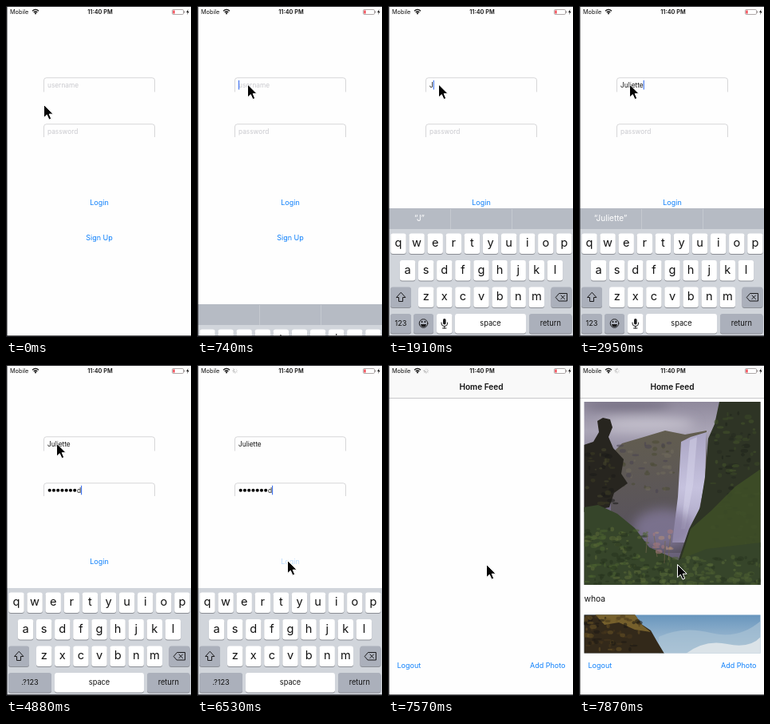
Recreate the animation shown at these times as an HTML page. Size 232 px wide and 414 px high, loop 8000 ms.

```html
<!DOCTYPE html>
<html lang="en">
<head>
<meta charset="utf-8">
<title>Login flow</title>
<style>
  html, body { margin: 0; width: 100%; height: 100%; overflow: hidden; background: #fff; }
  svg { display: block; width: 100vw; height: 100vh; }
  text { font-family: Inter, Roboto, "Liberation Sans", sans-serif; font-size: 8.3px; fill: #111; white-space: pre; }
  .hint { fill: #c9c9ce; }
  .link { font-size: 9px; fill: #0f80fb; }
  .mid { text-anchor: middle; }
  .end { text-anchor: end; }
  .key { font-size: 14.6px; text-anchor: middle; }
  .small { font-size: 9.2px; text-anchor: middle; }
  .line { fill: none; stroke: #1b1b1d; stroke-linecap: round; stroke-linejoin: round; }
  .caret { fill: #3a6ff0; }
</style>
</head>
<body>
<svg id="stage" viewBox="0 0 232 414" preserveAspectRatio="none">
  <defs>
    <linearGradient id="sky" x2="0" y2="1">
      <stop offset="0" stop-color="#8f899c"/><stop offset=".16" stop-color="#aaa5b6"/>
      <stop offset=".4" stop-color="#77708a"/><stop offset="1" stop-color="#625a70"/>
    </linearGradient>
    <linearGradient id="fall" x2="0" y2="1">
      <stop offset="0" stop-color="#aaa5c3"/><stop offset=".5" stop-color="#c6c2de"/><stop offset="1" stop-color="#a59fbe"/>
    </linearGradient>
    <linearGradient id="hill" x2="0" y2="1">
      <stop offset="0" stop-color="#625d4f"/><stop offset="1" stop-color="#565060"/>
    </linearGradient>
    <linearGradient id="blue" x2="0" y2="1">
      <stop offset="0" stop-color="#6795bd"/><stop offset="1" stop-color="#b4c9d9"/>
    </linearGradient>
    <filter id="soft" x="-50%" y="-50%" width="200%" height="200%"><feGaussianBlur stdDeviation="7"/></filter>
    <clipPath id="pic1"><rect x="6.5" y="46" width="221" height="229"/></clipPath>
    <clipPath id="pic2"><rect x="6.5" y="312.5" width="221" height="48"/></clipPath>
  </defs>

  <rect width="232" height="414" fill="#fefefe"/>
  <g id="login">
    <g fill="none" stroke="#d2d2d4" stroke-width=".9">
      <path d="M47.5 107.5V93q0-3.2 3.2-3.2H183.300q3.200 0 3.200 3.200V107.500"/>
      <path d="M47.500 164V151q0-3.200 3.200-3.200H183.300q3.200 0 3.200 3.200V164"/>
    </g>
    <text id="userHint" class="hint" x="52" y="102">username</text>
    <text id="user" x="52" y="102"></text>
    <text id="passHint" class="hint" x="52" y="160">password</text>
    <g id="dots" fill="#050505"></g>
    <text id="last" y="160"></text>
    <rect id="caret" class="caret" width="1.1" height="11.5"/>
    <text id="loginBtn" class="link mid" x="117" y="248.700">Login</text>
    <text class="link mid" x="117" y="293">Sign Up</text>
  </g>

  <g id="home">
    <rect y="0" width="232" height="414" fill="#fefefe"/>
    <rect width="232" height="41" fill="#f9f9f9"/>
    <rect y="41" width="232" height=".7" fill="#b4b4b6"/>
    <text class="mid" x="117" y="31" font-weight="600" style="font-size:10.1px">Home Feed</text>
    <g id="feed">
      <g clip-path="url(#pic1)" id="photo1"></g>
      <text x="6.500" y="295.500" style="font-size:10.300px">whoa</text>
      <g clip-path="url(#pic2)" id="photo2"></g>
    </g>
    <text class="link" x="11.500" y="378.500">Logout</text>
    <text class="link end" x="222.500" y="378.500">Add Photo</text>
  </g>

  <g id="keyboard"></g>

  <g id="status">
    <text x="5" y="10" style="font-size:7.300px">Mobile</text>
    <g fill="none" stroke="#111" stroke-width="1.300">
      <path d="M33 6.200q4-3.600 8 0M34.700 8q2.300-2 4.600 0"/>
      <circle cx="37" cy="9.300" r=".5"/>
    </g>
    <g id="spinner" stroke="#777" stroke-width=".8" stroke-linecap="round"></g>
    <text class="mid" x="118" y="10" font-weight="600" style="font-size:7.300px">11:40 PM</text>
    <rect x="208.500" y="4.500" width="14" height="6" rx="1.200" fill="#fff" stroke="#8d8585" stroke-width=".7"/>
    <rect x="209.500" y="5.500" width="2" height="4" fill="#f0303c"/>
    <rect x="223.300" y="6.300" width="1" height="2.400" fill="#8d8585"/>
    <path d="M228.500 4l-2.400 4h1.700l-.7 3 2.500-4.200h-1.700z" fill="#111"/>
  </g>

  <path id="pointer" d="M0 0V16.200L3.800 12.700L6.500 18.700L9.200 17.500L6.700 11.700H11.700Z" fill="#050505" stroke="#fff" stroke-width="1"/>
  <path d="M0 0H232V.9H1.500V412.300H232V414H0Z" fill="#1c1c1f"/>
</svg>

<script>
const LOOP = 8000;
const NAME = 'Juliette';
const PASS = 'password';
const $ = id => document.getElementById(id);

// Each row: start time, then the value held until the next row.
const pointerPath = [
  [0, 47.5, 123.5], [150, 50, 119], [290, 58, 106], [440, 63.5, 98],
  [5330, 70, 112], [5480, 90, 150], [5630, 112, 195], [5780, 126, 227],
  [5930, 120, 240], [6080, 113.5, 244.5], [6830, 117, 246], [6970, 123.5, 249.5]
];
const keyboardDrop = [
  [0, 170], [740, 120], [880, 22], [1030, 1.5], [1180, 0],
  [7120, 42], [7270, 112], [7420, 170]
];
const homeDrop = [[0, 414], [7270, 190], [7420, 35], [7570, 0]];
const nameLength = [
  [0, 0], [1770, 1], [1920, 2], [2060, 3], [2210, 4],
  [2360, 5], [2500, 6], [2800, 7], [2950, 8]
];
const passLength = [
  [0, 0], [3690, 1], [3840, 2], [3990, 3], [4280, 4],
  [4580, 5], [4730, 7], [4880, 8]
];
const loginFade = [[0, 1], [6380, .2], [6530, .27], [6680, 1]];
const FOCUS_USER = 740, FOCUS_PASS = 3090, MASK_ALL = 6970;
const SPIN = 6530, FEED = 7720;

const rowAt = (table, t) => table.filter(r => r[0] <= t).pop();
const at = (table, t) => rowAt(table, t)[1];
const show = (el, on) => el.setAttribute('display', on ? 'inline' : 'none');
const move = (el, x, y) => el.setAttribute('transform', `translate(${x} ${y})`);

function cap(x, y, w, fill = '#fff', h = 25.5) {
  return `<rect x="${x}" y="${y + 1}" width="${w}" height="${h}" rx="3" fill="#8b8e95"/>` +
    `<rect x="${x}" y="${y}" width="${w}" height="${h}" rx="3" fill="${fill}"/>`;
}
function keyRow(letters, cx, y) {
  return [...letters].map((c, i) => {
    const x = cx + i * 23.1;
    return cap(x - 9.7, y, 19.4) + `<text class="key" x="${x}" y="${y + 16.6}">${c}</text>`;
  }).join('');
}
function wordKey(word, x, w, fill) {
  return cap(x, 385, w, fill, 24.5) + `<text class="small" x="${x + w / 2}" y="400.3">${word}</text>`;
}

function buildKeyboard() {
  const grey = '#abb0bb';
  $('keyboard').innerHTML = `
    <g id="bar">
      <rect y="253" width="232" height="27" fill="#b6bbc4"/>
      <path d="M78.500 254V279M155.500 254V279" stroke="#c9cdd4" stroke-width=".8"/>
      <text id="suggest" class="mid" x="39.500" y="268.500" style="font-size:10px;fill:#fff"></text>
    </g>
    <rect y="279" width="232" height="135" fill="#d1d5db"/>
    ${keyRow('qwertyuiop', 13, 284.5)}
    ${keyRow('asdfghjkl', 24.6, 318)}
    ${keyRow('zxcvbnm', 47.7, 351.5)}
    ${cap(3, 351.5, 26, grey)}${cap(204.5, 351.5, 26, grey)}
    <path class="line" d="M16 358.500L10.500 364.500H13.500V369.500H18.500V364.500H21.500Z"/>
    <path class="line" d="M210.500 364.200L214.500 359.500H224.500V369H214.500ZM217 362L221.500 366.500M221.500 362L217 366.500"/>
    <g id="textKeys">
      ${wordKey('123', 3, 26, grey)}${cap(32, 385, 25, grey, 24.5)}${cap(61, 385, 19.5, '#fff', 24.5)}
      ${wordKey('space', 84, 89, '#fff')}
      <circle class="line" cx="44.500" cy="397" r="5.300"/>
      <path d="M41 398H48Q47.500 401.500 44.500 401.500T41 398Z" fill="#1b1b1d"/>
      <circle cx="42.600" cy="395" r=".9"/><circle cx="46.400" cy="395" r=".9"/>
      <rect x="69" y="391" width="3.600" height="7.500" rx="1.800" fill="#1b1b1d"/>
      <path class="line" d="M67 396V397Q67 400.500 70.800 400.500T74.600 397V396M70.800 400.500V403M68.500 403H73"/>
    </g>
    <g id="secureKeys">${wordKey('.?123', 3, 54, grey)}${wordKey('space', 61, 112, '#fff')}</g>
    ${wordKey('return', 177, 53.5, grey)}`;
}

// Seeded tufts give rock and grass their speckled texture.
function tufts(n, seed, x, y, w, h, colors) {
  let s = seed, out = '';
  const rnd = () => (s = (s * 16807) % 2147483647) / 2147483647;
  for (let i = 0; i < n; i++) {
    const c = colors[Math.floor(rnd() * colors.length)];
    out += `<ellipse cx="${x + rnd() * w}" cy="${y + rnd() * h}" rx="${1 + rnd() * 4}" ry="${1 + rnd() * 2}" fill="${c}" opacity=".55"/>`;
  }
  return out;
}
const shape = (d, fill, extra = '') => `<path d="${d}" fill="${fill}" ${extra}/>`;

function buildPhotos() {
  const cliff = 'M176 46H228V276H132L124 246L138 205L152 178L158 140L162 92L170 74Z';
  const grass = 'M6 178L24 175L48 186L70 204L88 228L124 244L160 230L228 222V276H6Z';
  $('photo1').innerHTML =
    '<rect x="6" y="46" width="222" height="230" fill="url(#sky)"/>' +
    '<g filter="url(#soft)"><ellipse cx="85" cy="74" rx="60" ry="8" fill="#c5c1cd"/><ellipse cx="60" cy="50" rx="55" ry="7" fill="#777184"/></g>' +
    shape('M40 112L54 98L78 91L108 82L133 87L160 82V235H40Z', 'url(#hill)') +
    tufts(45, 31, 50, 96, 72, 65, ['#4c4b36', '#6f6a5c', '#4a4450']) +
    shape('M128 96L140 90L160 84L158 145L149 190L140 222L117 222L124 165Z', 'url(#fall)') +
    shape('M139 94L148 90L143 150L133 205L128 205L134 150Z', '#d8d5ec', 'opacity=".5"') +
    '<ellipse cx="106" cy="205" rx="38" ry="25" fill="#857c9d" opacity=".75" filter="url(#soft)"/>' +
    shape('M6 100L18 96L25 84L23 70L30 66L39 68L42 78L37 90L43 104L56 118L53 136L61 148L44 160L38 178L6 184Z', '#27251f') +
    tufts(35, 77, 10, 104, 36, 70, ['#3b3b24', '#1b1a18', '#45452c']) +
    shape(cliff, '#2e3425') +
    tufts(110, 5, 168, 60, 60, 165, ['#44552b', '#1e231b', '#3b4a27', '#262a20']) +
    shape('M228 130L196 152L166 182L140 205L128 242L150 236L228 228Z', '#3f4f27', 'opacity=".85"') +
    shape(grass, '#36452a') +
    tufts(150, 12, 8, 205, 78, 70, ['#4c6130', '#27331e', '#5b6b38']) +
    tufts(130, 99, 90, 240, 138, 35, ['#4d5f32', '#29351f', '#586a3a']) +
    '<path d="M107 248L108 220M98 240L94 213M112 244L115 212M84 235L86 212" stroke="#75684c" stroke-width=".7"/>' +
    tufts(12, 41, 90, 208, 26, 26, ['#a97a7c', '#b28f78']);
  $('photo2').innerHTML =
    '<rect x="6" y="312" width="222" height="49" fill="url(#blue)"/>' +
    shape('M100 340Q130 326 165 335T228 320V361H100Z', '#a9c2d5', 'opacity=".7"') +
    shape('M134 361Q158 343 186 349T228 340V361Z', '#dbe3e8') +
    shape('M6 312H70L78 324L90 332L98 346L107 361H6Z', '#33291a') +
    shape('M20 312H70L80 326L90 334L70 331L50 322L32 325Z', '#76602c') +
    tufts(70, 8, 8, 314, 68, 46, ['#1c1813', '#6b5426', '#48381d']);
}

function buildSpinner() {
  let s = '';
  for (let i = 0; i < 8; i++)
    s += `<line x1="0" y1="-1.500" x2="0" y2="-3" transform="rotate(${i * 45})" opacity="${.12 + i * .11}"/>`;
  $('spinner').innerHTML = s;
}

function buildDots() {
  $('dots').innerHTML = [...PASS].map((_, i) =>
    `<circle cx="${54.7 + i * 5.25}" cy="156.800" r="2.050"/>`).join('');
}

function drawFields(t) {
  const n = at(nameLength, t), p = at(passLength, t);
  const typed = NAME.slice(0, n), masked = t >= MASK_ALL;
  const user = $('user'), last = $('last'), caret = $('caret');
  user.textContent = typed;
  $('suggest').textContent = n ? `“${typed}”` : '';
  show($('userHint'), !n);
  show($('passHint'), !p);

  const hidden = masked ? p : Math.max(0, p - 1);
  [...$('dots').children].forEach((dot, i) => show(dot, i < hidden));
  last.textContent = p && !masked ? PASS[p - 1] : '';
  const lastX = 52.2 + hidden * 5.25;
  last.setAttribute('x', lastX);

  const inPass = t >= FOCUS_PASS;
  const end = inPass
    ? lastX + (last.textContent ? last.getComputedTextLength() : 0)
    : 52 + (n ? user.getComputedTextLength() : 0);
  show(caret, t >= FOCUS_USER);
  caret.setAttribute('x', end);
  caret.setAttribute('y', inPass ? 150.8 : 93);
}

function draw(t) {
  drawFields(t);
  const secure = t >= FOCUS_PASS;
  show($('bar'), !secure);
  show($('textKeys'), !secure);
  show($('secureKeys'), secure);
  move($('keyboard'), 0, at(keyboardDrop, t));
  move($('home'), 0, at(homeDrop, t));
  show($('feed'), t >= FEED);
  $('loginBtn').setAttribute('opacity', at(loginFade, t));

  show($('spinner'), t >= SPIN);
  const turn = Math.floor((t - SPIN) / 148) * 45;
  $('spinner').setAttribute('transform', `translate(47.8 7.2) rotate(${turn})`);

  const [, x, y] = rowAt(pointerPath, t);
  move($('pointer'), x, y);
}

buildKeyboard();
buildPhotos();
buildSpinner();
buildDots();

const start = performance.now();
function tick() {
  draw((performance.now() - start) % LOOP);
  requestAnimationFrame(tick);
}
tick();
</script>
</body>
</html>
```
